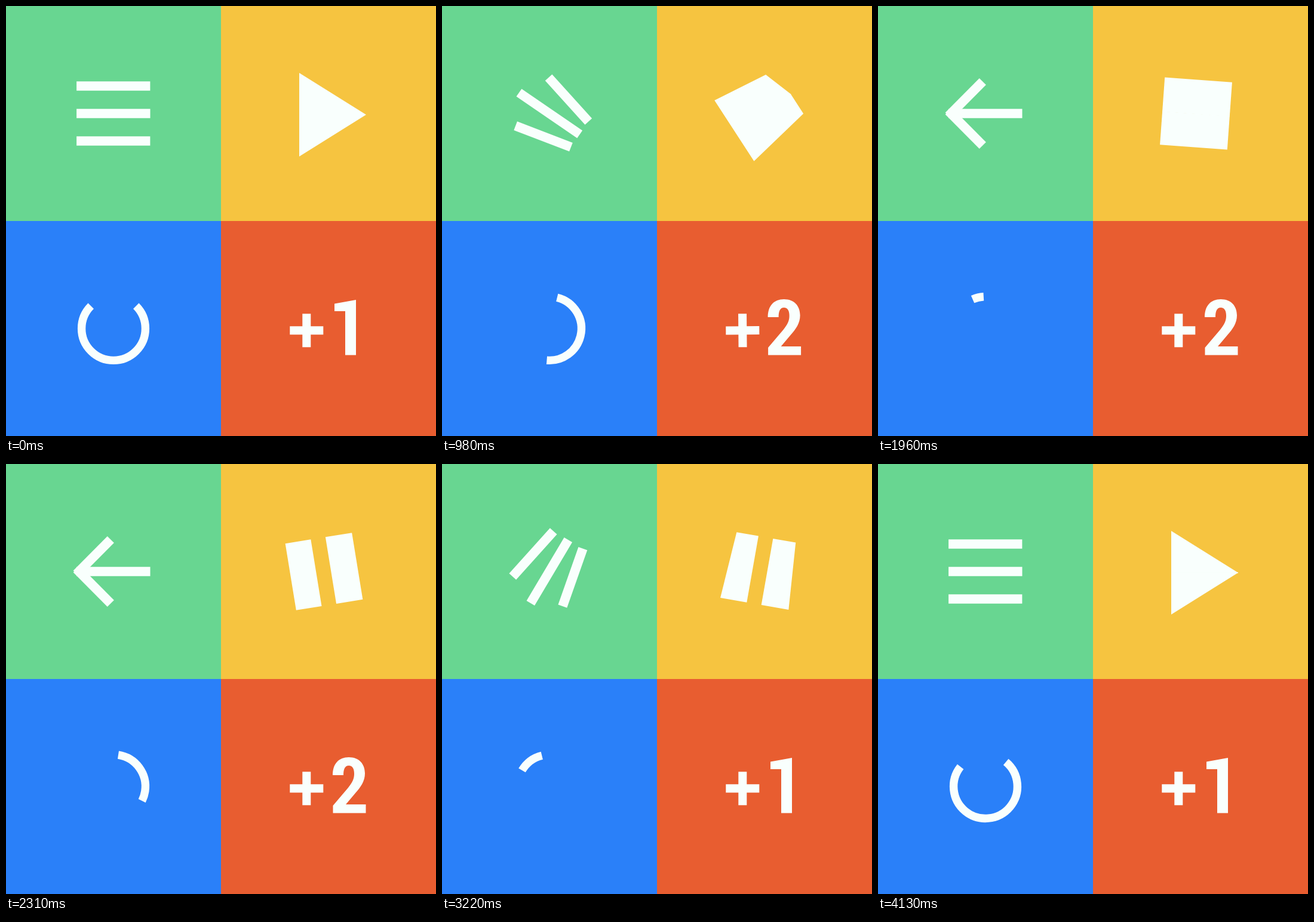
Write an HTML page with a canvas that moves like this. It is 720 px wide and 720 px high and loops after 4.2 s.

```html
<!DOCTYPE html>
<html lang="en">
<head>
<meta charset="utf-8">
<title>Four morphing icons</title>
<style>
  html, body { margin: 0; height: 100%; overflow: hidden; }
  canvas { display: block; }
</style>
</head>
<body>
<canvas width="720" height="720" role="img" aria-label="Menu, play, loading and +1 icons"></canvas>
<script>
const ctx = document.querySelector('canvas').getContext('2d');
const LOOP = 4200, STEP = 70, WHITE = '#f9fffd', RAD = Math.PI / 180;

const mix = (a, b, p) => a + (b - a) * p;
const clamp = x => Math.min(1, Math.max(0, x));

// cubic-bezier(.4, 0, .2, 1), solved by bisection
function ease(x) {
  if (x <= 0) return 0;
  if (x >= 1) return 1;
  let lo = 0, hi = 1, s;
  for (let i = 0; i < 24; i++) {
    s = (lo + hi) / 2;
    const r = 1 - s;
    if (1.2 * r * r * s + 0.6 * r * s * s + s * s * s < x) lo = s; else hi = s;
  }
  return s * s * (3 - 2 * s);
}
const span = (t, start, length) => ease((t - start) / length);

function at(x, y, degrees, draw) {
  ctx.save();
  ctx.translate(x, y);
  ctx.rotate(degrees * RAD);
  draw();
  ctx.restore();
}

function poly(...points) {
  ctx.beginPath();
  points.forEach(([x, y]) => ctx.lineTo(x, y));
  ctx.closePath();
  ctx.fill();
}

function morph(from, to, p) {
  poly(...from.map(([x, y], i) => [mix(x, to[i][0], p), mix(y, to[i][1], p)]));
}

function line(x1, y1, x2, y2) {
  ctx.beginPath();
  ctx.moveTo(x1, y1);
  ctx.lineTo(x2, y2);
  ctx.stroke();
}

function menu(t) {
  const turn = 180 * (span(t, 750, 1000) + span(t, 2790, 1000));
  const p = span(t, 630, 1120) - span(t, 2750, 1120);
  at(179.8, 180, turn, () => {
    ctx.lineWidth = 15.7;
    line(-61.7, 0, 61.7, 0);
    for (const side of [-1, 1]) {
      line(mix(-61.7, 4.5, p), side * mix(46, 53.5, p), 61.6, side * mix(46, -4, p));
    }
  });
}

const H = 56.5;
const PLAY = [[-41.5, -68], [14.5, -33], [70.5, 2], [70.5, 2], [-41.5, 72]];
const SQUARE = [[-H, -H], [H, -H], [H, 0], [H, H], [-H, H]];

function player(t) {
  if (t < 1700) {
    at(532.5, 180, -90 * span(t, 770, 700), () => morph(PLAY, SQUARE, span(t, 670, 700)));
  } else if (t < 3000) {
    const gap = 15 * span(t, 1890, 700) - 0.7;
    at(532.5, 180, 90 * (span(t, 1870, 700) - 1), () => {
      for (const side of [-1, 1]) {
        const inner = side * gap - 0.8, outer = side * H;
        poly([outer, -H], [inner, -H], [inner, H], [outer, H]);
      }
    });
  } else {
    const p = span(t, 3090, 700);
    const gap = 15 * Math.max(0, 1 - 1.15 * p) - 0.7;
    at(532.5, 180, 90 * (p - 1), () => {
      for (const side of [-1, 1]) {
        const inner = mix(-0.8, 2, p) + side * gap;
        const tip = mix(side * H, 2, p), left = mix(-H, -41.5, p), right = mix(H, 70.5, p);
        poly([left, mix(side * H, side * 70 + 2, p)], [right, tip],
             [right, side * Math.min(side * inner, side * tip)], [left, inner]);
      }
    });
  }
}

function spinner(t) {
  const cycle = 1400, phase = t % cycle;
  const base = 104 * t / cycle + 256 * Math.floor(t / cycle) - 90;
  const from = base + 45 + 256 * span(phase, 0, 700);
  const to = base + 315 + 256 * span(phase, 700, 700);
  ctx.lineWidth = 13.4;
  ctx.beginPath();
  ctx.arc(180, 540, 53.4, from * RAD, to * RAD);
  ctx.stroke();
}

const ONE = new Path2D('M550 498.5L586 492V584.5H568V511H550Z');
const TWO = new Path2D(
  'M547 521C547 502 557 491 574 491C591 491 601 502 601 518C601 531 594 541 585 551' +
  'L569 570H602.5V584.5H547.5V572L573 542C580 533 583 527 583 519' +
  'C583 510 580 505 574 505C567.5 505 565 511 565 521Z');

// Shows a digit on one side of the diagonal x + y = edge
function digit(shape, shift, edge, far) {
  ctx.save();
  ctx.beginPath();
  ctx.moveTo(edge - 450, 450);
  ctx.lineTo(edge - 650, 650);
  ctx.lineTo(far, 650);
  ctx.lineTo(far, 450);
  ctx.clip();
  ctx.translate(shift, 0);
  ctx.fill(shape);
  ctx.restore();
}

function counter(t) {
  const turn = 90 * (span(t, 350, 700) - span(t, 2310, 700));
  at(503.3, 543.3, turn, () => {
    ctx.lineWidth = 14;
    line(-28, 0, 28, 0);
    line(0, -28, 0, 28);
  });
  const back = t >= 2310;
  const x = clamp((t - (back ? 2310 : 350)) / 700);
  const edge = 1038 + 171 * x;
  const [before, after] = back ? [TWO, ONE] : [ONE, TWO];
  if (x < 1) digit(before, 0, edge, 1000);
  if (x > 0) digit(after, (back ? 14 : -14) * (1 - x), edge, 0);
}

function draw(now) {
  const t = Math.floor(now % LOOP / STEP) * STEP;
  ['#68d691', '#f6c440', '#2a80f9', '#e85d30'].forEach((color, i) => {
    ctx.fillStyle = color;
    ctx.fillRect(i % 2 * 360, (i >> 1) * 360, 360, 360);
  });
  ctx.fillStyle = ctx.strokeStyle = WHITE;
  menu(t);
  player(t);
  spinner(t);
  counter(t);
}

const start = performance.now();
function tick() {
  draw(performance.now() - start);
  requestAnimationFrame(tick);
}
tick();
</script>
</body>
</html>
```
